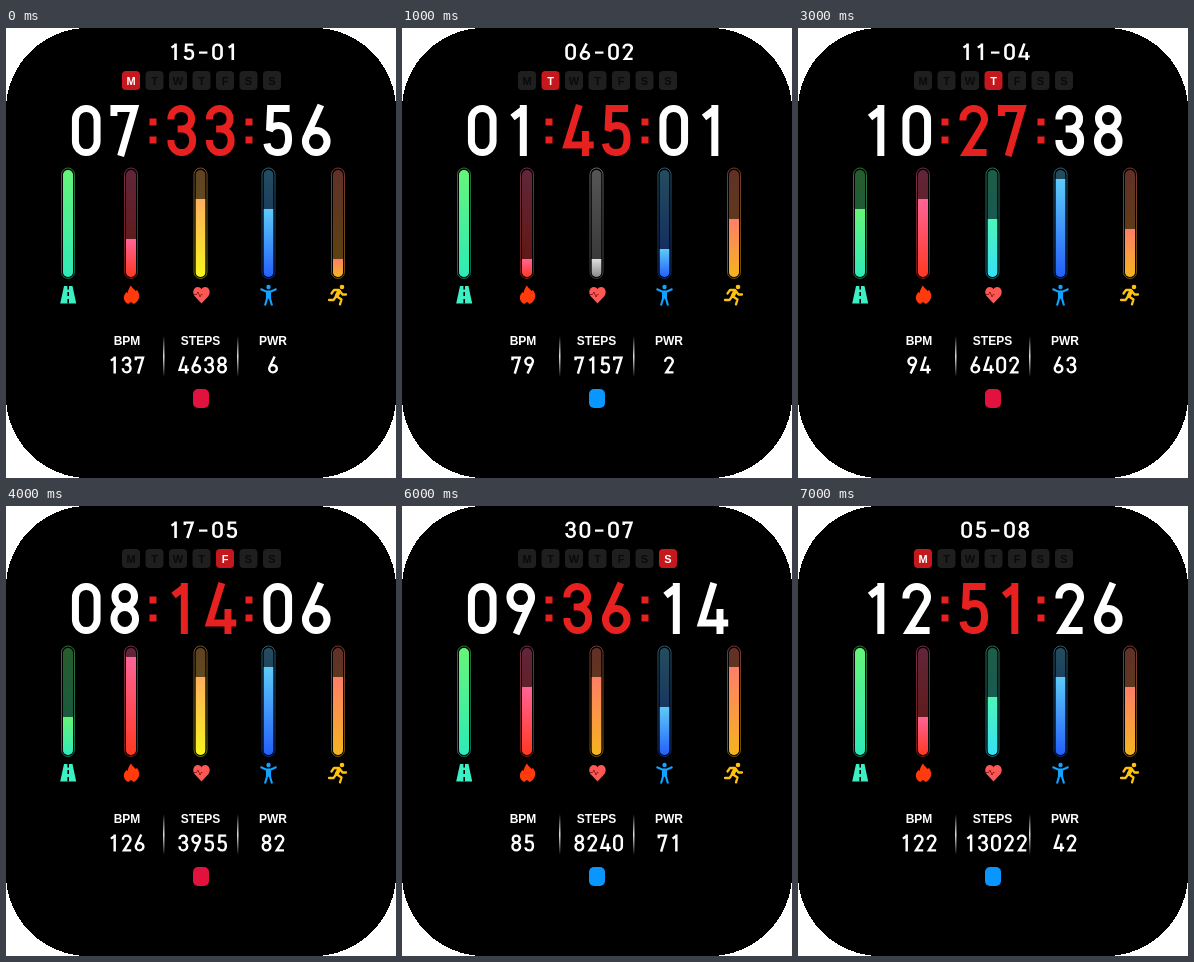
Write an HTML page that moves like this. It is 390 px wide and 450 px high and loops after 8000 ms.

```html
<!DOCTYPE html>
<html lang="en">
<head>
<meta charset="utf-8">
<title>Watch face</title>
<style>
html, body { margin: 0; width: 100%; height: 100%; overflow: hidden; background: #fff; }
svg { display: block; width: 390px; height: 450px; }
text { font-family: "Liberation Sans", Arial, sans-serif; font-weight: bold; text-anchor: middle; }
.label { font-size: 12px; fill: #fff; }
.digits path { fill: none; stroke-width: 6.8; }
.white path { stroke: #fff; }
.red path { stroke: #e6211f; }
.day rect { fill: #1f1f1f; }
.day text { font-size: 11px; fill: #0a0a0a; }
.day.on rect { fill: #c4181c; }
.day.on text { fill: #fff; }
</style>
</head>
<body>
<svg viewBox="0 0 390 450">
  <defs>
    <linearGradient id="rule" x2="0" y2="1">
      <stop stop-color="#fff" stop-opacity="0"/>
      <stop offset=".5" stop-color="#ddd"/>
      <stop offset="1" stop-color="#fff" stop-opacity="0"/>
    </linearGradient>
  </defs>
  <rect width="390" height="450" rx="82" shape-rendering="crispEdges"/>

  <g id="date" class="digits white"></g>
  <g id="days"></g>
  <g id="hour" class="digits white"></g>
  <g id="minute" class="digits red"></g>
  <g id="second" class="digits white"></g>
  <path fill="#e6211f" d="M143.5 90.5h7v7h-7zm0 18h7v7h-7zM239.5 90.5h7v7h-7zm0 18h7v7h-7z"/>

  <g id="bars"></g>

  <!-- road -->
  <path fill="#3cf0c4" d="M58 258h8.500l3.700 17.500h-16z"/>
  <path stroke="#000" stroke-width="1.6" d="M62.2 258v3.500m0 2.500v4m0 3v4.500"/>
  <!-- flame -->
  <path fill="#ff3a0c" d="M125 257.500c1 2.500 3.500 3.500 4.500 5.500l1.500-1c2 2.500 2.800 5.500 1.800 8.500-.8 2.500-2.800 4.500-5 5.500l-2.800-2-2.800 2c-2.500-1-4-3-4.300-5.500-.3-3 1-5 2.800-6.500l1 1c.3-3 1.500-5.500 3.300-7.500z"/>
  <!-- heart -->
  <path fill="#ff5854" d="M195.500 275.500l-7-7.500c-2.500-3.500-1-9 3.200-9 1.800 0 3 .8 3.800 2.300.8-1.500 2-2.300 3.800-2.300 4.200 0 5.700 5.500 3.200 9z"/>
  <path fill="none" stroke="#8c201c" d="M188 266.500h2.500l1.500-2.500 2 5 1.500-3 1 1"/>
  <!-- body -->
  <g fill="none" stroke="#12a2ff" stroke-width="2.1">
    <circle cx="262.500" cy="259" r="2.200" fill="#12a2ff" stroke="none"/>
    <path d="M254.500 261l5.500 2.500h5l5.500-2.500M261 263.500v7l-2 7M264 263.500v7l2 7"/>
    <path stroke-width="3.800" d="M262.500 262.800v8"/>
  </g>
  <!-- runner -->
  <g fill="none" stroke="#ffc20e" stroke-width="2.300" stroke-linecap="round" stroke-linejoin="round">
    <circle cx="336" cy="259" r="2.300" fill="#ffc20e" stroke="none"/>
    <path d="M325.500 265.500l2.500-3.500h5l3.500 4.500h3.500M330 268.500l-2.500 3.500h-4.500M331 268.500l4.500 3-1.500 4.800"/>
    <path stroke-width="4" d="M333 263.500l-2.300 4.500"/>
  </g>

  <text class="label" x="121" y="317">BPM</text>
  <text class="label" x="194.500" y="317">STEPS</text>
  <text class="label" x="267" y="317">PWR</text>
  <path fill="url(#rule)" d="M157 308h1.500v41h-1.500zM231 308h1.500v41h-1.500z"/>
  <g id="bpm" class="digits white"></g>
  <g id="steps" class="digits white"></g>
  <g id="power" class="digits white"></g>
  <rect id="link" x="187" y="361" width="16" height="19" rx="5"/>
</svg>

<script>
// Strokes of each character in a 28 x 51 cell
const GLYPHS = {
  0: 'M14 3.5a10.5 11 0 0 1 10.5 11v22a10.5 11 0 0 1-21 0v-22a10.5 11 0 0 1 10.5-11z',
  1: 'M16.5 51V0M6 12.5L16.500 4.300',
  2: 'M3.5 15.5V14a10.5 10.5 0 0 1 21 0q0 4-3.500 9L6.500 47.5H26.500',
  3: 'M3.5 14.500v-1a10 10 0 0 1 20 0v1a9.5 9.5 0 0 1-9.5 9.5h-4M14 24a10.5 10.5 0 0 1 10.5 10.5v2a10.5 11 0 0 1-21 0V35',
  4: 'M15.500 0L3.500 40H29.500M21.500 26V51',
  5: 'M25.500 3.500H7L6 25.500C8 22 11 20.500 14.500 20.500c7 0 10 4.500 10 13.500S21 47.500 14 47.500c-6 0-9.500-3-10.500-9',
  6: 'M18.500 0L4.800 31M3.500 36.500a10.500 11 0 1 1 21 0a10.500 11 0 1 1-21 0',
  7: 'M3.500 11V3.500H23.500L10 51',
  8: 'M4.500 13.500a9.500 10 0 1 1 19 0a9.500 10 0 1 1-19 0zM3.500 36a10.500 11.500 0 1 1 21 0a10.500 11.500 0 1 1-21 0z',
  9: 'M9.500 51L23.200 20M24.500 14.500a10.500 11 0 1 1-21 0a10.500 11 0 1 1 21 0',
  '-': 'M3 28H25'
};

const COLORS = {
  green: ['#66f578', '#2eeab8'],
  pink: ['#ff6498', '#ff3822'],
  yellow: ['#ffae60', '#f6f61c'],
  orange: ['#ff7e68', '#f5b41e'],
  gray: ['#e0e0e0', '#8a8a8a'],
  teal: ['#50f5b8', '#34e0f5'],
  blue: ['#5ecbf8', '#2460fa']
};
const BAR_X = [62, 125, 194.5, 262.5, 332];
const BAR_COLORS = ['green', 'pink', '', 'blue', 'orange'];
const LINK = { red: '#e2123f', blue: '#0a96ff' };

// date, h:m:s, bpm, steps, power, weekday, heart color, link color, bar levels
const STATES = [
  '15-01 07:33:56 137 4638 6 0 yellow red 10,3,7,6,1',
  '06-02 01:45:01 79 7157 2 1 gray blue 10,1,1,2,5',
  '06-03 11:08:47 160 9661 45 2 orange blue 10,10,7,8,7',
  '11-04 10:27:38 94 6402 63 3 teal red 6,7,5,9,4',
  '17-05 08:14:06 126 3955 82 4 yellow red 3,9,7,8,7',
  '22-06 23:00:01 46 11124 8 5 gray red 10,10,1,7,2',
  '30-07 09:36:14 85 8240 71 6 orange blue 10,6,7,4,8',
  '05-08 12:51:26 122 13022 42 0 teal blue 10,3,5,7,6'
].map(row => row.split(' '));

const $ = id => document.getElementById(id);

function write(id, str, cx, y, step, sx, sy) {
  const left = cx - str.length * step / 2 + (step - 28 * sx) / 2;
  $(id).innerHTML = [...str].map((c, i) =>
    `<path d="${GLYPHS[c]}" transform="translate(${left + i * step} ${y}) scale(${sx} ${sy})"/>`).join('');
  $(id).setAttribute('aria-label', str);
}

const writeTime = (id, str, cx) => write(id, str, cx, 77, 38.5, 1.03, 1);
const writeValue = (id, str, cx) => write(id, str, cx, 328.5, 12.9, .36, .335);

function bar(x, color, level) {
  const paint = `url(#${color})`;
  const top = 241 - level * 10;
  return `<g transform="translate(${x} 0)">
    <rect x="-6.500" y="140" width="13" height="110.500" rx="6.500" fill="none" stroke="${paint}" opacity=".45"/>
    <g clip-path="url(#tube)">
      <rect x="-5" y="142" width="10" height="107" fill="${paint}" opacity=".38"/>
      <rect x="-5" y="${top}" width="10" height="${249 - top}" fill="${paint}"/>
    </g></g>`;
}

function show(state) {
  const [date, time, bpm, steps, power, day, heart, link, levels] = state;
  const [h, m, s] = time.split(':');
  write('date', date, 197.2, 15.5, 14.3, .385, .325);
  writeTime('hour', h, 99.5);
  writeTime('minute', m, 195);
  writeTime('second', s, 291);
  writeValue('bpm', bpm, 120.7);
  writeValue('steps', steps, steps.length > 4 ? 198 : 196.7);
  writeValue('power', power, 267);
  [...$('days').children].forEach((el, i) => el.classList.toggle('on', i === +day));
  $('bars').innerHTML = levels.split(',').map((n, i) =>
    bar(BAR_X[i], BAR_COLORS[i] || heart, +n)).join('');
  $('link').setAttribute('fill', LINK[link]);
}

document.querySelector('defs').innerHTML +=
  '<clipPath id="tube"><rect x="-5" y="142" width="10" height="107" rx="5"/></clipPath>' +
  Object.entries(COLORS).map(([id, [a, b]]) =>
    `<linearGradient id="${id}" x2="0" y2="1"><stop stop-color="${a}"/><stop offset="1" stop-color="${b}"/></linearGradient>`).join('');

$('days').innerHTML = [...'MTWTFSS'].map((c, i) =>
  `<g class="day" transform="translate(${125 + i * 23.5} 0)">
    <rect x="-9" y="43" width="18" height="19" rx="4"/><text y="56.500">${c}</text></g>`).join('');

let shown = -1;
function tick() {
  const i = Math.floor(performance.now() / 1000) % STATES.length;
  if (i !== shown) show(STATES[shown = i]);
  requestAnimationFrame(tick);
}
tick();
</script>
</body>
</html>
```
